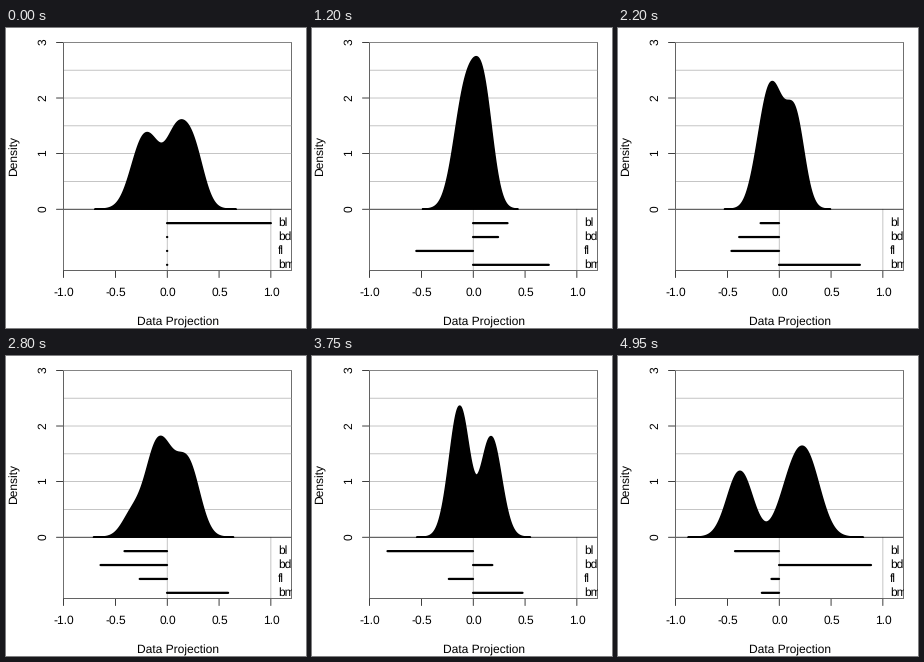
Recreate the animation shown at these times as a matplotlib script. Size 300 px wide and 300 px high, loop 5 s.

```python
import numpy as np
import matplotlib.pyplot as plt
from matplotlib.animation import FuncAnimation
from matplotlib.patches import Rectangle

plt.rcParams.update({"font.family": "Liberation Sans", "path.snap": False,
                     "text.hinting": "none"})

SIZE, DPI = 300, 100
FRAMES, INTERVAL = 100, 50
PT = 72 / DPI                 # points per pixel
LWD = 0.75                    # pixels per unit of line weight
LEFT, TOP, SIDE = 57.6, 14.4, 228
RIGHT, BOTTOM = LEFT + SIDE, TOP + SIDE
GRID, FRAME = "0.7", "0.5"
LABELS = ["bl", "bd", "fl", "bm"]


def px(x):
    return LEFT + (np.asarray(x) + 1) * SIDE / 2.2


def py(y):
    return TOP + (3 - np.asarray(y)) * SIDE / 4.1


# Penguin measurements (bill length, bill depth, flipper, body mass):
# one Gaussian per species and sex, sexes lying either side of the mean.
RANGE = np.array([27.5, 8.4, 59, 3600])
HALF_RANGE = 0.912
SD = np.array([2.2, 0.8, 5.6, 310])
CORR = 0.28
# count, spread, mean, half the difference between the sexes
SPECIES = [(151, 1.07, [38.8, 18.35, 190, 3700], [1.56, 0.72, 2.3, 337]),
           (68, 0.85, [48.8, 18.42, 195.8, 3733], [2.26, 0.83, 4.1, 206]),
           (123, 0.93, [47.5, 14.98, 217.2, 5076], [1.95, 0.74, 4.4, 402])]


def build_mixture():
    scale = RANGE * HALF_RANGE
    base = np.outer(SD / scale, SD / scale) * (CORR + (1 - CORR) * np.eye(4))
    weights, means, covs = [], [], []
    for count, spread, mean, shift in SPECIES:
        for sex in (-1, 1):
            weights.append(count / 2)
            means.append((np.array(mean) + sex * np.array(shift)) / scale)
            covs.append(base * spread ** 2)
    total = sum(weights)
    weights, means = np.array(weights) / total, np.array(means)
    return total, weights, means - weights @ means, np.array(covs)


TOTAL, WEIGHTS, MEANS, COVS = build_mixture()


def mixture(x, mu, var):
    z = (x[:, None] - mu) ** 2 / var
    return (np.exp(-z / 2) / np.sqrt(2 * np.pi * var)) @ WEIGHTS


def density(axis):
    """Kernel density estimate of the data projected on an axis."""
    mu = MEANS @ axis
    var = np.einsum("i,kij,j->k", axis, COVS, axis)
    sd = np.sqrt(WEIGHTS @ (var + mu ** 2))
    wide = np.linspace(-1.2, 1.2, 1201)
    cdf = np.cumsum(mixture(wide, mu, var))
    q1, q3 = np.interp([0.25, 0.75], cdf / cdf[-1], wide)
    bw = 0.9 * min(sd, (q3 - q1) / 1.34) * TOTAL ** -0.2
    reach = 2.7 * np.sqrt(var) + 3 * bw
    x = np.linspace((mu - reach).min(), (mu + reach).max(), 512)
    return x, mixture(x, mu, var + bw ** 2)


# The tour: great-circle arcs between a few projection axes.
KNOTS = [(0, [1, 0, 0, 0]),
         (29.2, [0.07, 0.254, -0.582, 0.772]),
         (33, [0.027, 0.104, -0.572, 0.808]),
         (53.5, [-0.317, -0.722, -0.25, 0.56]),
         (83, [-0.784, 0.528, -0.152, 0.282]),
         (96.2, [-0.445, 0.885, 0.028, -0.115]),
         (99, [-0.427, 0.886, -0.075, -0.168])]


def unit(v):
    return np.array(v) / np.linalg.norm(v)


def tour(frame):
    for (t0, a), (t1, b) in zip(KNOTS, KNOTS[1:]):
        if frame <= t1:
            break
    a, b = unit(a), unit(b)
    angle = np.arccos(a @ b)
    u = (frame - t0) / (t1 - t0)
    return (np.sin((1 - u) * angle) * a + np.sin(u * angle) * b) / np.sin(angle)


fig = plt.figure(figsize=(SIZE / DPI, SIZE / DPI), dpi=DPI, facecolor="white")
ax = fig.add_axes([0, 0, 1, 1])
ax.set(xlim=(0, SIZE), ylim=(SIZE, 0))
ax.axis("off")
region = Rectangle((LEFT, TOP), SIDE, SIDE, fill=False, lw=0)
ax.add_patch(region)


def clip(artist):
    artist.set_clip_on(True)
    artist.set_clip_path(region)


def line(x, y, color="black", lwd=1, z=1, clipped=False):
    item, = ax.plot(x, y, color=color, lw=lwd * LWD * PT, zorder=z, clip_on=False,
                    solid_capstyle="round", solid_joinstyle="round")
    if clipped:
        clip(item)
    return item


def box(color, z):
    line([LEFT, RIGHT, RIGHT, LEFT, LEFT], [TOP, TOP, BOTTOM, BOTTOM, TOP], color, z=z)


def text(x, y, s, ha="center", rotation=0):
    return ax.text(x, y, s, size=12 * PT, ha=ha, va="baseline",
                   rotation=rotation, rotation_mode="anchor", zorder=5)


box("black", 1)
line(px([-1, 1]), [BOTTOM] * 2)
for v in np.arange(-1, 1.1, 0.5):
    line([px(v)] * 2, [BOTTOM, BOTTOM + 7.2])
    text(px(v) + 0.4, 268.3, f"{v:.1f}")
line([LEFT] * 2, py([0, 3]))
for v in range(4):
    line([LEFT - 7.2, LEFT], [py(v)] * 2)
    text(40.3, py(v) - 0.7, str(v), rotation=90)
text(LEFT + SIDE / 2 + 0.4, 297.4, "Data Projection")
text(12, TOP + SIDE / 2, "Density", rotation=90)

for v in np.arange(0.5, 3.1, 0.5):
    line([LEFT, RIGHT], [py(v)] * 2, GRID, z=2, clipped=True)
for v in (-1, 0, 1):
    line([px(v)] * 2, py([-1.1, 0]), GRID, z=2, clipped=True)

shape, = ax.fill([0], [0], fc="black", ec="black", lw=2 * LWD * PT,
                 joinstyle="round", zorder=3)
clip(shape)
line([LEFT, RIGHT], [py(0)] * 2, z=4, clipped=True)
box(FRAME, 4)

bars = []
for i, label in enumerate(LABELS):
    y = py(-0.25 * (i + 1))
    bars.append(line(px([0, 0]), [y, y], lwd=3, z=4, clipped=True))
    clip(text(272.1, y + 3.2, label, ha="left"))


def draw(frame):
    axis = tour(frame)
    x, y = density(axis)
    shape.set_xy(np.column_stack([px(x), py(y)]))
    for bar, value in zip(bars, axis):
        bar.set_xdata(px([-0.002, value]))    # an empty bar still shows a dot
    return [shape, *bars]


anim = FuncAnimation(fig, draw, frames=FRAMES, interval=INTERVAL,
                     repeat=True, repeat_delay=0, blit=False)
plt.show()
```
